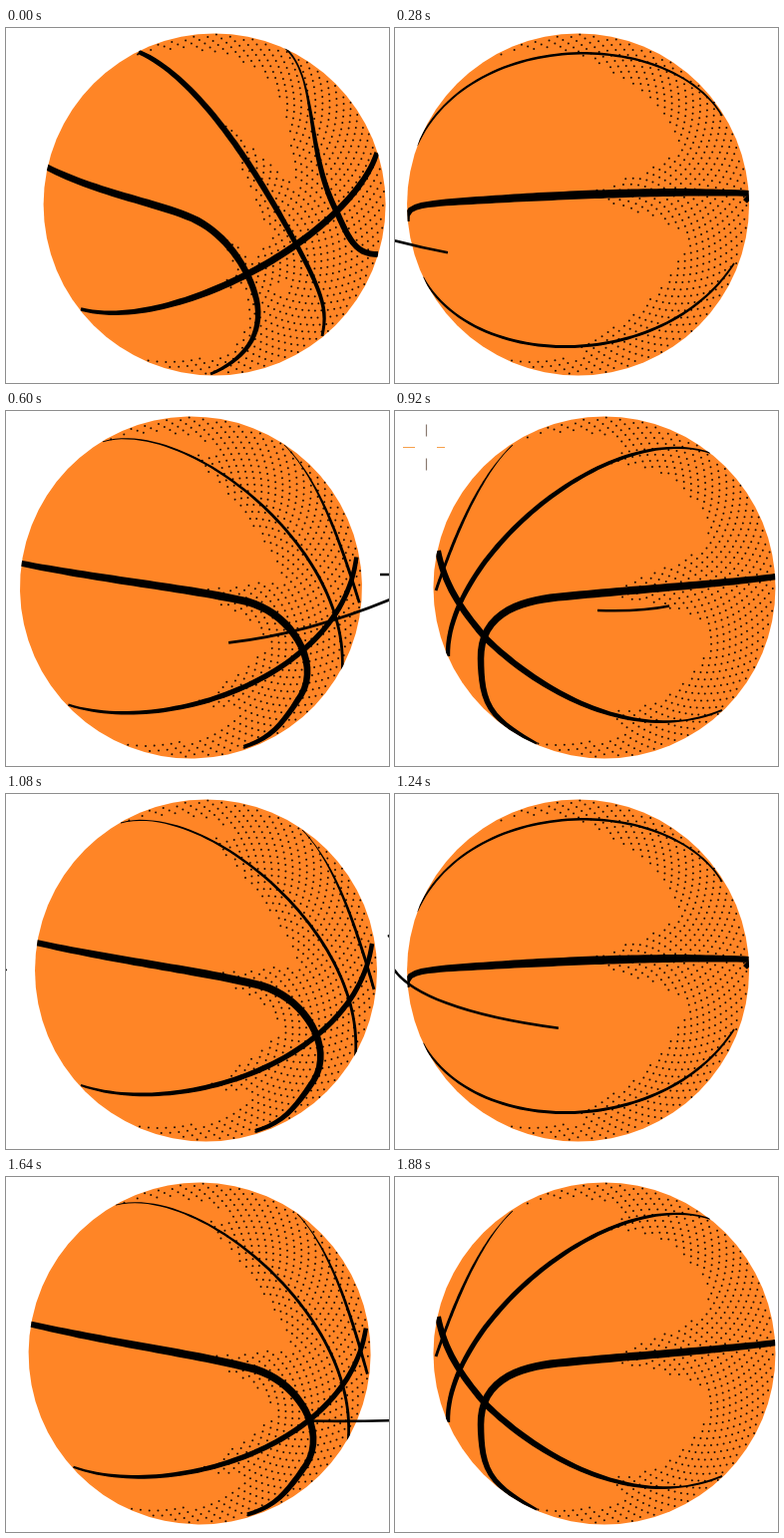
Recreate the animation shown at these times as an HTML page. Size 384 by 356 pixels, loop 1.92 s.

```html
<!DOCTYPE html>
<html lang="en">
<head>
<meta charset="utf-8">
<title>Spinning basketball</title>
<style>
html, body { margin: 0; width: 100%; height: 100%; overflow: hidden; background: #fff; }
svg { display: block; width: 100%; height: 100%; }
</style>
</head>
<body>
<svg id="stage" viewBox="0 0 384 356">
  <defs id="defs"><clipPath id="rim"><circle r="171.7"/></clipPath></defs>
  <g id="ball"><circle r="171.5" fill="#ff8526"/></g>
  <g id="swooshes" fill="none" stroke="#000" stroke-width="2.6"></g>
  <g id="spark" fill="none" stroke-width="1.2">
    <path id="sparkH" stroke="#f6a04c"/>
    <path id="sparkV" stroke="#8a7a70"/>
  </g>
</svg>
<script>
const LOOP = 1920, STEP = 40, SWAY = 960, HOLD = 120;
const RADIUS = 171.5, CY = 177, GOLDEN = Math.PI * (3 - Math.sqrt(5));
const $ = id => document.getElementById(id);
const clamp = v => Math.max(0, Math.min(1, v));
const wave = (t, lead) => Math.cos(2 * Math.PI * (t + lead) / SWAY);
const ballX = t => 193 + 17 * wave(t, 50);
const tilt = t => 3.45 * wave(t, 93);

function add(parent, tag, attrs) {
  const el = document.createElementNS('http://www.w3.org/2000/svg', tag);
  for (const key in attrs) el.setAttribute(key, attrs[key]);
  return parent.appendChild(el);
}

// A seam is a curve in stage space at time `at`; the ink is `peak` wide at fraction `mid`.
const seam = (peak, mid, d) => ({ peak, mid, d });
const poses = [
  { at: 0, seams: [
    seam(7.5, .35, 'M40 139C90 165 150 175 185 190S242 240 250 268S250 328 205 347'),
    seam(7, .58, 'M75 282C168 306 345 208 372 125'),
    seam(6, .4, 'M133 24C198 52 260 160 290 215S322 285 317 309'),
    seam(6, .85, 'M280 20C313 50 300 125 332 185C345 215 352 227 373 227')
  ] },
  { at: 1080, seams: [
    seam(8, .42, 'M30 149C110 167 200 178 255 192C300 204 330 255 308 288S275 330 250 338'),
    seam(5.5, .65, 'M75 292C170 325 350 270 367 150'),
    seam(3, .7, 'M115 29C200 5 375 148 348 280'),
    seam(3, .8, 'M297 36C330 70 350 130 369 196')
  ] },
  { at: 280, seams: [
    seam(8.5, .5, 'M12 194C10 178 25 178 50 175C150 168 250 164 320 165S348 167 351 174'),
    seam(2.5, .5, 'M22 118C75 0 275 0 328 88'),
    seam(3, .5, 'M28 250C80 345 270 345 340 236')
  ] },
  { at: 920, seams: [
    seam(8, .4, 'M383 166C320 174 230 180 170 186C120 190 85 205 86 250S95 308 142 334'),
    seam(6.5, .2, 'M43 140C50 178 72 206 92 229C150 285 245 335 328 300'),
    seam(5, .3, 'M53 246C50 150 212 8 316 42'),
    seam(3, .2, 'M41 180C55 140 80 70 118 34')
  ] }
];

// Evenly spaced points along a curve, measured from the ball's centre.
function trace(d, cx, count = 60) {
  const curve = add($('defs'), 'path', { d }), length = curve.getTotalLength();
  return Array.from({ length: count + 1 }, (_, i) => {
    const p = curve.getPointAtLength(length * i / count);
    return { x: p.x - cx, y: p.y - CY };
  });
}

function brush(line, { peak, mid }) {
  const last = line.length - 1, left = [], right = [];
  line.forEach(({ x, y }, i) => {
    const p = line[Math.max(0, i - 1)], q = line[Math.min(last, i + 1)];
    const dx = q.x - p.x, dy = q.y - p.y;
    const width = peak * Math.max(.3, 1 - 1.5 * (i / last - mid) ** 2);
    const k = width / 2 / Math.hypot(dx, dy);
    left.push([x - dy * k, y + dx * k]);
    right.unshift([x + dy * k, y - dx * k]);
  });
  return 'M' + left.concat(right).map(p => p.map(v => v.toFixed(1)).join(' ')).join('L') + 'Z';
}

// Shade gathers along the rim and the seams, and deepens away from the light on the left.
function shaded(x, y, lines) {
  const rimGap = RADIUS - Math.hypot(x, y);
  let seamGap = RADIUS;
  for (const line of lines)
    for (const p of line) seamGap = Math.min(seamGap, Math.hypot(p.x - x, p.y - y));
  const rim = Math.max(0, .22 * (x + 90)) / rimGap;
  const crease = Math.max(0, .3 * (x + 2)) / seamGap;
  return rim * rim + crease * crease > 1;
}

// Sunflower lattice of ink dots.
function stipple(lines) {
  let d = '';
  for (let n = 1, r; (r = 3.8 * Math.sqrt(n)) < RADIUS - 1; n++) {
    const x = r * Math.cos(n * GOLDEN), y = r * Math.sin(n * GOLDEN);
    if (shaded(x, y, lines)) d += `M${x.toFixed(1)} ${y.toFixed(1)}h.01`;
  }
  return d;
}

const views = poses.map(({ at, seams }) => {
  const view = add($('ball'), 'g', { 'clip-path': 'url(#rim)' });
  const lines = seams.map(s => trace(s.d, ballX(at)));
  add(view, 'path', { d: stipple(lines), stroke: '#1c0d02', 'stroke-width': 2, 'stroke-linecap': 'round' });
  lines.forEach((line, i) => add(view, 'path', { d: brush(line, seams[i]) }));
  return view;
});

// The tail follows the head along the curve, `lag` ms behind.
const swooshes = [
  { start: 230, travel: 340, lag: 176, d: 'M-5 212C120 245 240 250 390 187' },
  { start: 560, travel: 40, lag: 40, d: 'M375 164H390' },
  { start: 860, travel: 167, lag: 60, d: 'M203 200C262 202 310 198 390 138' },
  { start: 1071, travel: 374, lag: 275, d: 'M-5 169C20 225 200 250 390 244' }
].map(s => {
  const el = add($('swooshes'), 'path', { d: s.d });
  return { ...s, el, length: el.getTotalLength() };
});

function drawSwoosh({ start, travel, lag, el, length }, t) {
  const head = length * clamp((t - start) / travel);
  const tail = length * clamp((t - start - lag) / travel);
  el.style.display = head > tail ? '' : 'none';
  el.setAttribute('stroke-dasharray', `0 ${tail} ${head - tail} ${length * 2}`);
}

function drawSpark(t) {
  $('spark').style.display = Math.abs(t - 920) <= STEP ? '' : 'none';
  const inner = 11 + (t - 920) / 10, outer = inner + 12;
  const x = 31, y = 36.5;
  $('sparkH').setAttribute('d', `M${x - outer} ${y}H${x - inner}M${x + inner} ${y}H${x + outer - 4}`);
  $('sparkV').setAttribute('d', `M${x + .5} ${y - outer}V${y - inner}M${x + .5} ${y + inner}V${y + outer}`);
}

function draw(t) {
  const current = Math.floor(t / HOLD) % poses.length;
  views.forEach((view, i) => { view.style.display = i === current ? '' : 'none'; });
  const turn = tilt(t) - tilt(poses[current].at);
  $('ball').setAttribute('transform', `translate(${ballX(t)} ${CY}) rotate(${turn})`);
  swooshes.forEach(s => drawSwoosh(s, t));
  drawSpark(t);
}

const started = performance.now();
function tick() {
  const t = (performance.now() - started) % LOOP;
  draw(Math.floor(t / STEP) * STEP);
  requestAnimationFrame(tick);
}
tick();
</script>
</body>
</html>
```
